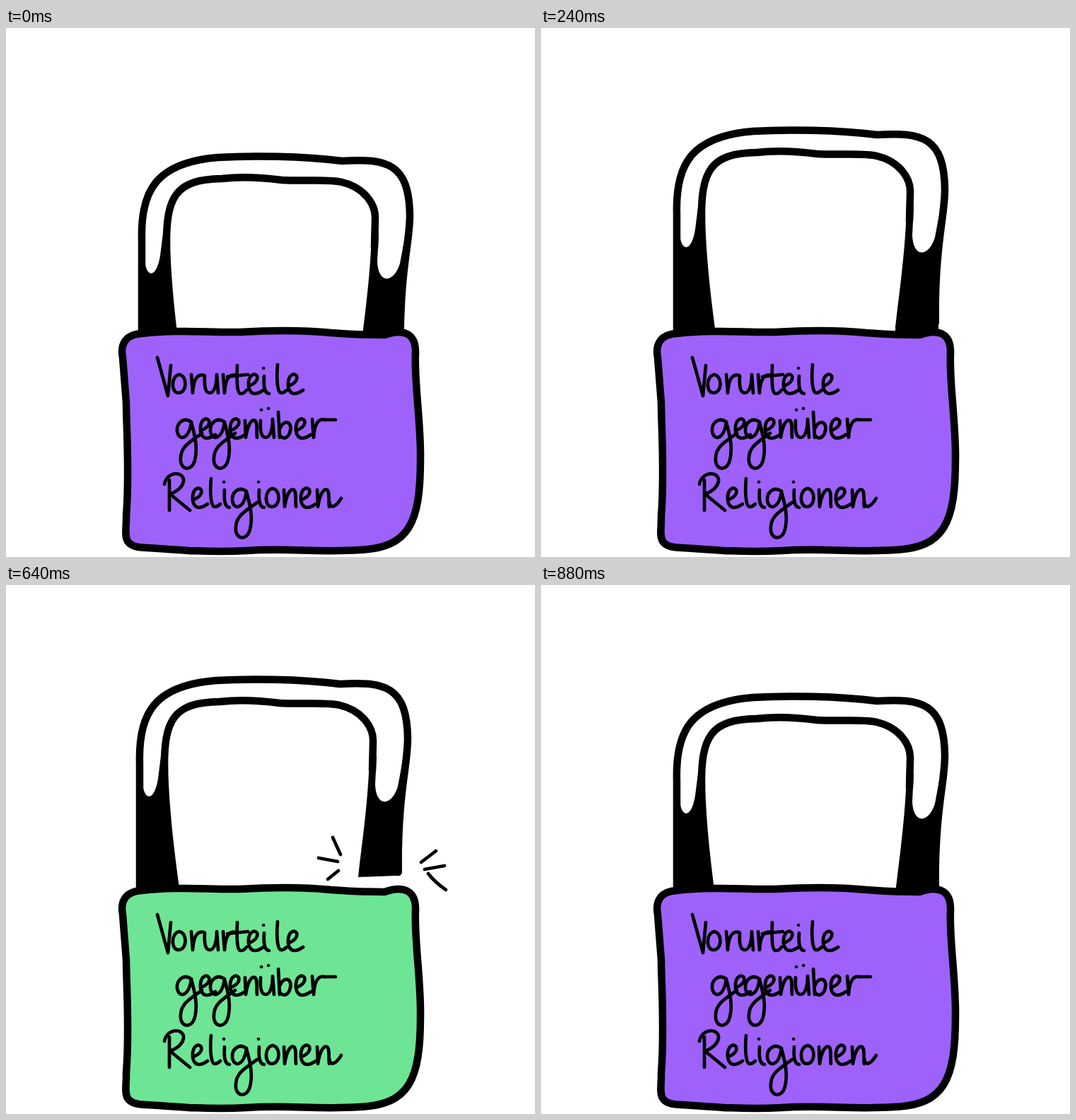
Write an HTML page that moves like this. It is 748 by 748 pixels and loops after 0.96 s.

```html
<!DOCTYPE html>
<html lang="de">
<head>
<meta charset="utf-8">
<title>Vorurteile gegenüber Religionen</title>
<style>
  html, body { margin: 0; width: 100%; height: 100%; overflow: hidden; background: #fff; }
  svg { display: block; width: 748px; height: 748px; }
  path { stroke-linecap: round; stroke-linejoin: round; }
  .bold { fill: none; stroke: #000; stroke-width: 10.5; }
  .pen { fill: none; stroke: #000; stroke-width: 4.7; }
</style>
</head>
<body>
<svg viewBox="0 0 748 748">
  <g id="shackle">
    <path class="bold" d="M192 480V300C190 230 212 190 300 183C345 180 420 181 475 188
      C540 184 570 192 571 265C571 305 557 340 557.500 454"/>
    <path class="bold" d="M227 310C226 238 240 214 305 213C330 210 360 211 390 215
      C425 217 455 213 475 218C505 225 523 248 522 270L521 310"/>
    <path d="M187 490V300L197 335C201 353 213 352 218 322L222 290H232C232 350 240 420 250 490Z"/>
    <path d="M501 461C505 420 515 360 517 290H527L525 330C526 362 548 362 557 333L566 285L574 295
      C564 340 561 370 563 454Q562 460 555 459Z"/>
    <path id="foot" d="M502 455L499 480H562V450Z"/>
  </g>
  <path id="body" class="bold" d="M165 466C161 445 171 433 192 432C240 426 290 431 330 430
    C380 427 430 428 460 431Q500 434 535 434C560 425 580 430 579 460C577 500 587 560 586 610
    C586 700 570 735 500 738C440 742 400 735 340 739C290 742 240 738 200 735
    C160 735 171 715 170 690C175 630 170 560 170 530Z"/>
  <g id="lettering"></g>
  <g id="rays">
    <path class="pen" d="M462 357L473 381M442 386L469 391M470 404L455 416"/>
    <path class="pen" d="M608 376L587 392M620 397L592 402M597 408Q606 420 622 431"/>
  </g>
</svg>
<script>
const $ = id => document.getElementById(id);
const PURPLE = '#9e62fb', GREEN = '#6ee594', STEP = 80, STEPS = 12;

// Pen strokes of each letter, with the origin at the left end of its baseline.
const glyphs = {
  V: 'M0-50L15 4L19-39',
  R: 'M7-38V5M0-32C4-52 29-50 27-36C25-26 16-21 8-18L36 5',
  b: 'M0-36L2 0M2-12C8-28 22-22 16-6C12 3 5 2 2-4',
  e: 'M0-10C8-12 14-18 12-24C9-29 1-26 0-15C-1-4 4 1 9 1C14 1 18-2 21-4',
  g: 'M21-22C10-30 0-20 1-9C3 5 17 4 21-21C27 0 30 16 26 32C22 49 4 47 6 28C7 12 20 6 36-6',
  i: 'M0-24C-1-10 0 0 7 1M-1-35h.1',
  l: 'M0-40C-2-18 0 0 5 0C9 0 11-2 13-4',
  n: 'M0-24L1 0C3-14 8-27 14-24C18-21 16-8 17 0',
  o: 'M9-26C-3-24-3 0 8 0C20 0 21-24 9-26',
  r: 'M0-26L2 0C3-16 7-28 18-25',
  t: 'M0-39C-1-12 0 1 5 1C9 1 11-1 13-4M-14-23L15-26',
  u: 'M0-24C-1-9 1 0 7 0C13 0 17-10 17-26L19 0',
  '-': 'M0-25H17',
  '~': 'M0-8C1 4 9 1 17-12'
};
glyphs['ü'] = glyphs.u + 'M1-39h.1M11-41h.1';

function write(word, baseline, ...xs) {
  [...word].forEach((letter, i) => {
    const path = document.createElementNS('http://www.w3.org/2000/svg', 'path');
    path.setAttribute('class', 'pen');
    path.setAttribute('d', glyphs[letter]);
    path.setAttribute('transform', `translate(${xs[i]} ${baseline})`);
    $('lettering').append(path);
  });
}

write('Vorurteile', 516, 214, 236, 262, 281, 307, 327, 343, 365, 384, 399);
write('gegenüber-', 579, 241, 275, 288, 317, 338, 360, 385, 410, 433, 449);
write('Religionen~', 677, 224, 264, 290, 309, 319, 358, 368, 393, 417, 440, 457);

const show = (node, on) => node.setAttribute('visibility', on ? 'visible' : 'hidden');
const move = (node, x, y) => node.setAttribute('transform', `translate(${x} ${y})`);

function draw(time) {
  const step = Math.floor(time / STEP) % STEPS;
  const retry = step >= 9, open = step >= 4 && !retry;
  const lift = retry ? 12 * (step - 9) : step && 4 + 11 * Math.min(step, 4);
  const spread = step === 6 ? 5 : 0;

  move($('shackle'), open ? -3 : 0, -lift);
  show($('foot'), !open);
  $('body').style.fill = open ? GREEN : PURPLE;
  show($('rays'), open && step !== 4 && step !== 7);
  const [left, right] = $('rays').children;
  move(left, -spread, 0);
  move(right, spread, 0);
}

const start = performance.now();
function tick() {
  draw(performance.now() - start);
  requestAnimationFrame(tick);
}
tick();
</script>
</body>
</html>
```
